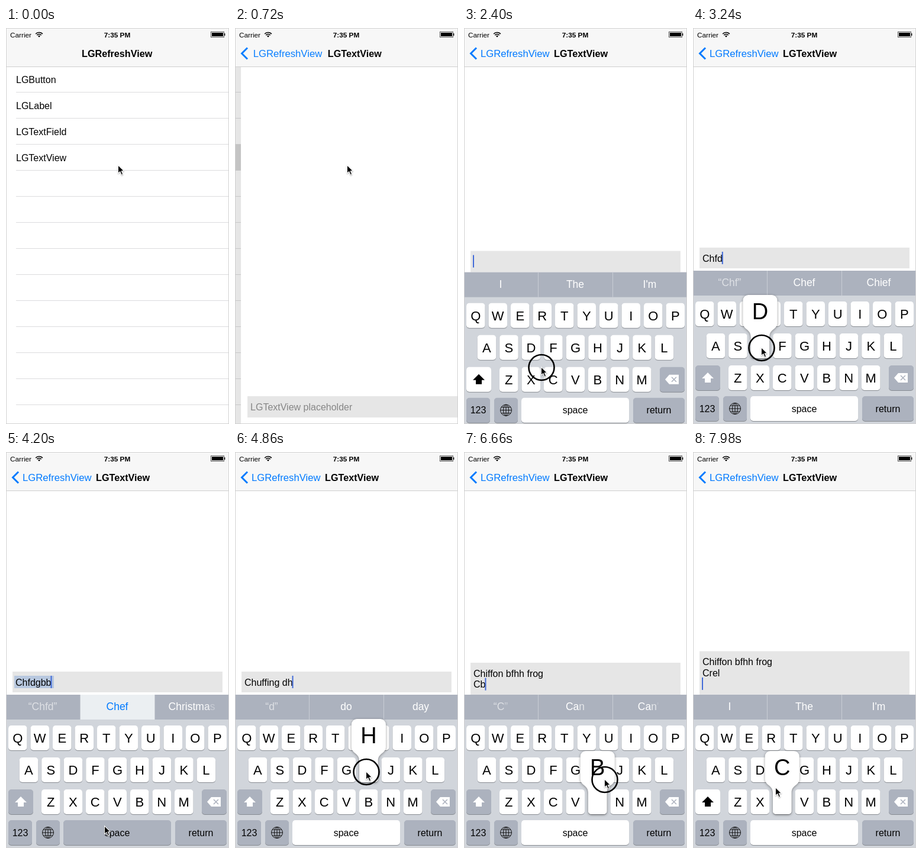
These frames come from a looping animation (377 by 669 pixels, 8000 ms). An HTML page with a canvas:

```html
<!DOCTYPE html>
<html lang="en">
<head>
<meta charset="utf-8">
<style>
html, body { margin: 0; width: 100%; height: 100%; overflow: hidden; background: #fff; }
canvas { display: block; }
</style>
</head>
<body>
<canvas id="stage" width="377" height="669"></canvas>
<script>
const g = document.getElementById('stage').getContext('2d');
const W = 377, H = 669, LOOP = 8000;
const FONT = '"Liberation Sans", Arial, sans-serif';
const BLUE = '#007aff', GREY = '#acb2be', SHEET = '#d1d5db';
const PUSH = 420, RISE = 2040, HOLD = 120;

// Taps: time, x, y, key, delay until the text changes, text it leaves behind
const taps = [
  [60, 190, 232], [1920, 196, 631],
  [2370, 131, 573, 'C', 60], [2690, 222, 541, 'H'], [2930, 152, 538, 'F'],
  [3160, 116, 540, 'D'], [3390, 187, 541, 'G'], [3630, 224, 575, 'B'],
  [3830, 225, 574, 'B'], [4060, 167, 632, 'space', 440, 'Chuffing '],
  [4680, 114, 540, 'D'], [4820, 222, 540, 'H'], [4960, 258, 541, 'J'],
  [5100, 152, 538, 'F'], [5230, 152, 538, 'F'], [5370, 187, 541, 'G'],
  [5700, 341, 636, 'return', 120, 'Chiffon bfhh frog\n'],
  [6360, 142, 568, 'C'], [6600, 238, 553, 'B'], [6800, 154, 540, 'F'],
  [6980, 222, 541, 'H'],
  [7260, 335, 634, 'return', 120, 'Chiffon bfhh frog\nCrel\n'],
  [7860, 140, 567, 'C', 300]
];

const hints = [
  [0, 'I', 'The', 'I\'m'], [2460, '“C”', 'Can', 'Can\'t'],
  [2740, '“Ch”', 'Check', 'Christmas'], [3000, '“Chf”', 'Chef', 'Chief'],
  [3940, '“Chfd”', 'Chef', 'Christmas'], [4500, 'I', 'and', 'the'],
  [4740, '“d”', 'do', 'day'], [5820, 'I', 'The', 'I\'m'],
  [6560, '“C”', 'Can', 'Can\'t'], [7380, 'I', 'The', 'I\'m']
];

// Cursor rests around each tap and eases between them
const path = [];
taps.forEach(([t, x, y], i) => {
  const next = taps[i + 1];
  path.push([t - 60, x, y], [Math.min(t + 140, next ? next[0] - 100 : LOOP), x, y]);
  if (i === 0) path.push([960, x, y]);
});

const keys = [];
const addRow = (letters, x, y) =>
  [...letters].forEach((k, i) => keys.push({ k, x: x + 37.5 * i, y, w: 31.5 }));
addRow('QWERTYUIOP', 4, 52);
addRow('ASDFGHJKL', 22.7, 106);
addRow('ZXCVBNM', 60, 160);
[['shift', 4, 160, 42], ['delete', 331, 160, 42], ['123', 4, 212, 40],
 ['globe', 51, 212, 40], ['space', 97, 212, 182], ['return', 286, 212, 87]]
  .forEach(([k, x, y, w]) => keys.push({ k, x, y, w }));

const clamp = v => Math.max(0, Math.min(1, v));
const spring = ms => ms <= 0 ? 0 : 1 - (1 + ms * .01826) * Math.exp(-ms * .01826);
const track = (t, list) => list.reduce((v, [at, to], i) =>
  i ? v + (to - list[i - 1][1]) * spring(t - at) : to, 0);

function rect(x, y, w, h, color) {
  g.fillStyle = color;
  g.fillRect(x, y, w, h);
}
function round(x, y, w, h, r, color) {
  g.fillStyle = color;
  g.beginPath();
  g.roundRect(x, y, w, h, r);
  g.fill();
}
function poly(points, color) {
  g.fillStyle = color;
  g.beginPath();
  points.forEach(([x, y]) => g.lineTo(x, y));
  g.closePath();
  g.fill();
}
function text(s, x, y, size, color = '#000', align = 'left', weight = '') {
  g.font = `${weight} ${size}px ${FONT}`;
  g.textAlign = align;
  g.fillStyle = color;
  g.fillText(s, x, y + size * .35);
}
function faded(alpha, draw) {
  g.save();
  g.globalAlpha *= clamp(alpha);
  draw();
  g.restore();
}

function textAt(t) {
  let s = '';
  for (const [at, , , key, delay = 30, result] of taps) {
    if (!key || t < at + delay) continue;
    if (result) s = result;
    else s += !s || s.endsWith('\n') ? key : key.toLowerCase();
  }
  return s;
}

function drawList(t, p) {
  g.save();
  g.translate(-W * .3 * p, 0);
  rect(0, 66, W, H, '#fff');
  if (t >= 360) rect(0, 197, W, 44, '#d9d9d9');
  ['LGButton', 'LGLabel', 'LGTextField', 'LGTextView']
    .forEach((s, i) => text(s, 17, 87 + 44 * i, 16));
  for (let y = 108; y < H; y += 44) rect(17, y, W, 1, '#dcdcde');
  g.restore();
  rect(0, 66, W, H, `rgba(0,0,0,${.1 * p})`);
}

function drawEditor(t, p, s) {
  const bottom = track(t, [[0, 658], [RISE, 410], [2430, 406], [5820, 410]]);
  const height = track(t, [[0, 36], [2430, 35], [5820, 54], [7380, 73.5]]);
  const top = bottom - height;
  g.save();
  g.translate(W * (1 - p), 0);
  rect(0, 66, W, H, '#fff');
  rect(11, top, 355, height, '#e6e6e6');
  g.beginPath();
  g.rect(11, top, 355, height);
  g.clip();
  if (t < RISE) text('LGTextView placeholder', 16, top + 18, 16, '#868686');
  else {
    const lines = s.split('\n');
    if (t >= 3900 && t < 4500) rect(14, top + 7, 67, 21, '#b8c8df');
    lines.forEach((line, i) => text(line, 16, top + 18 + 18.7 * i, 16));
    const last = lines.length - 1;
    g.font = `16px ${FONT}`;
    rect(15 + g.measureText(lines[last]).width, top + 7 + 18.7 * last, 2, 21, '#426bd8');
  }
  g.restore();
}

function drawNav(p) {
  rect(0, 0, W, 65, '#f7f7f7');
  rect(0, 65, W, 1, '#cfcfcf');
  const x = 128 - 100 * p;
  faded(1 - p * 1.5, () => text('LGRefreshView', x, 43, 16.2, '#000', 'left', 'bold'));
  faded(p, () => {
    text('LGRefreshView', x, 43, 16.7, BLUE);
    text('LGTextView', 152 + 180 * (1 - p), 43, 16.2, '#000', 'left', 'bold');
    g.strokeStyle = BLUE;
    g.lineWidth = 3;
    g.beginPath();
    g.moveTo(21, 33.5);
    g.lineTo(11.5, 43);
    g.lineTo(21, 52.5);
    g.stroke();
  });
  text('Carrier', 7, 11.5, 11.8);
  text('7:35 PM', 188, 11.5, 11.8, '#000', 'center', 'bold');
  g.strokeStyle = '#000';
  g.lineWidth = 1.7;
  for (const r of [8, 5]) {
    g.beginPath();
    g.arc(56, 15.5, r, -Math.PI * .76, -Math.PI * .24);
    g.stroke();
  }
  poly([[54, 13.5], [56, 12.5], [58, 13.5], [56, 15.8]], '#000');
  g.lineWidth = 1;
  g.strokeStyle = '#555';
  g.strokeRect(346.5, 6.5, 22, 9);
  rect(348, 8, 19, 6, '#000');
  rect(369, 9, 1.5, 4, '#333');
}

function drawHints(t) {
  const i = hints.findLastIndex(h => t >= h[0]);
  const now = hints[i], old = hints[i - 1] || now;
  const picked = t >= 3900 && t < 4500;
  rect(0, 0, W, 42, GREY);
  if (picked) rect(126, 0, 125, 42, '#ebeff2');
  rect(125, 0, 1, 42, '#c9cdd5');
  rect(251, 0, 1, 42, '#c9cdd5');
  for (let c = 1; c < 4; c++) {
    const s = now[c], size = 17.5;
    g.font = `${size}px ${FONT}`;
    const left = 62 + 126 * (c - 1) - g.measureText(s).width / 2;
    [...s].forEach((ch, n) => {
      const x = left + g.measureText(s.slice(0, n)).width;
      const alpha = ch === old[c][n] ? 1 : (t - now[0]) / 60 - n * .5;
      faded(clamp(alpha) * (s[0] === '“' ? .6 : 1), () =>
        text(ch, x, 20, size, picked && c === 2 ? BLUE : '#fff'));
    });
  }
}

function drawIcon(k, cx, cy, on) {
  if (k === 'shift') {
    poly([[0, -9], [10, 1], [5, 1], [5, 8], [-5, 8], [-5, 1], [-10, 1]]
      .map(([x, y]) => [cx + x, cy + y]), on ? '#000' : '#fff');
  } else if (k === 'delete') {
    poly([[-12, 0], [-5, -8], [11, -8], [11, 8], [-5, 8]]
      .map(([x, y]) => [cx + x, cy + y]), '#fff');
    g.strokeStyle = GREY;
    g.lineWidth = 1.6;
    g.beginPath();
    for (const d of [-1, 1]) {
      g.moveTo(cx - 1, cy - 4 * d);
      g.lineTo(cx + 7, cy + 4 * d);
    }
    g.stroke();
  } else {
    g.strokeStyle = '#111';
    g.lineWidth = 1;
    g.beginPath();
    for (const rx of [9.5, 4.5]) {
      g.moveTo(cx + rx, cy);
      g.ellipse(cx, cy, rx, 9.5, 0, 0, 7);
    }
    g.moveTo(cx, cy - 9.5);
    g.lineTo(cx, cy + 9.5);
    for (const [dy, w] of [[-5, 8], [0, 9.5], [5, 8]]) {
      g.moveTo(cx - w, cy + dy);
      g.lineTo(cx + w, cy + dy);
    }
    g.stroke();
  }
}

function drawPopup({ k, x, y, w }) {
  const cx = x + w / 2, l = Math.max(2, cx - 29), r = Math.min(W - 2, cx + 29), top = y - 65;
  g.save();
  g.shadowColor = 'rgba(0,0,0,.4)';
  g.shadowBlur = 4;
  g.shadowOffsetY = 1;
  g.fillStyle = '#fff';
  g.beginPath();
  g.moveTo(l + 9, top);
  g.arcTo(r, top, r, top + 9, 9);
  g.lineTo(r, y - 18);
  g.bezierCurveTo(r, y - 6, x + w, y - 8, x + w, y + 6);
  g.arcTo(x + w, y + 42, x, y + 42, 5);
  g.arcTo(x, y + 42, x, y, 5);
  g.lineTo(x, y + 6);
  g.bezierCurveTo(x, y - 8, l, y - 6, l, y - 18);
  g.arcTo(l, top, l + 9, top, 9);
  g.fill();
  g.restore();
  text(k, (l + r) / 2, top + 28, 38, '#000', 'center');
}

function drawKeyboard(t, s) {
  const y0 = track(t, [[0, H], [RISE, 410]]);
  const upper = !s || s.endsWith('\n');
  const tap = taps.find(([at]) => t >= at + 40 && t < at + 160);
  const pressed = tap && tap[3];
  let popup;
  g.save();
  g.translate(0, y0);
  rect(0, 0, W, 262, SHEET);
  drawHints(t);
  for (const key of keys) {
    const { k, x, y, w } = key, cx = x + w / 2, cy = y + 21;
    const letter = k.length === 1, down = k === pressed;
    let white = letter || k === 'space' || (k === 'shift' && upper);
    if (down && !letter) white = !white;
    round(x, y + 1, w, 42, 5, '#888c92');
    round(x, y, w, 42, 5, white ? '#fff' : GREY);
    if (letter) {
      if (down) popup = key;
      text(k, cx, cy + .5, 22, '#000', 'center');
    } else if (['shift', 'delete', 'globe'].includes(k)) drawIcon(k, cx, cy, upper);
    else text(k, cx, cy, 16, '#000', 'center');
  }
  if (popup) drawPopup(popup);
  g.restore();
}

function drawCursor(t) {
  const i = path.findLastIndex(q => t >= q[0]);
  const a = path[i], b = path[i + 1] || a;
  const u = clamp((t - a[0]) / (b[0] - a[0] || 1)), e = u * u * (3 - 2 * u);
  const x = a[1] + (b[1] - a[1]) * e, y = a[2] + (b[2] - a[2]) * e;
  if (taps.some(([at]) => t >= at && t < at + HOLD)) {
    g.strokeStyle = '#000';
    g.lineWidth = 2.6;
    g.beginPath();
    g.arc(x, y + .5, 21.5, 0, 7);
    g.stroke();
  }
  g.save();
  g.translate(x, y);
  g.shadowColor = 'rgba(0,0,0,.35)';
  g.shadowBlur = 2;
  g.shadowOffsetY = 1;
  poly([[-1, -1.5], [-1, 14.5], [2.7, 11.5], [5.2, 17], [8.4, 15.6], [6, 10.3], [10.6, 10]], '#fff');
  g.shadowColor = 'transparent';
  poly([[0, 1], [0, 12.3], [3, 9.7], [5.6, 15.5], [7, 14.9], [4.6, 9.2], [8.2, 9]], '#000');
  g.restore();
}

function draw(t) {
  const p = spring(t - PUSH), s = textAt(t);
  if (p < .999) drawList(t, p);
  if (p > 0) drawEditor(t, p, s);
  drawNav(p);
  if (t > RISE) drawKeyboard(t, s);
  g.strokeStyle = '#d2d2d2';
  g.lineWidth = 1;
  g.strokeRect(.5, .5, W - 1, H - 1);
  drawCursor(t);
}

const start = performance.now();
function frame() {
  draw((performance.now() - start) % LOOP);
  requestAnimationFrame(frame);
}
frame();
</script>
</body>
</html>
```
